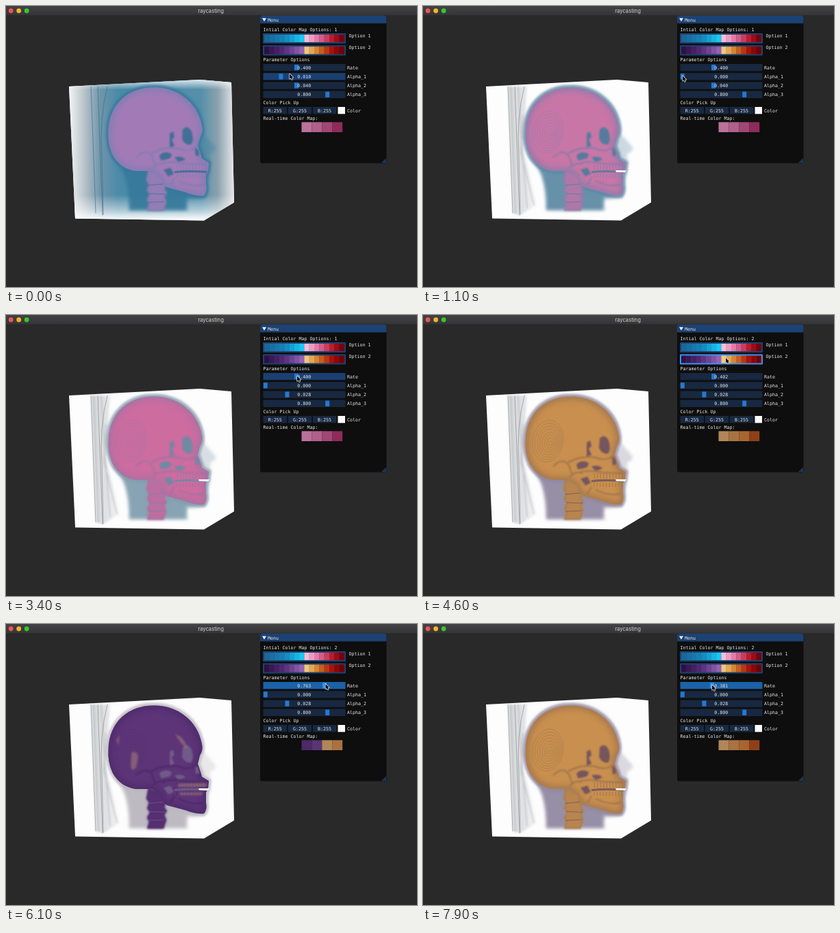
Recreate the animation shown at these times as an HTML page with a canvas. Size 600 px wide and 412 px high, loop 8000 ms.

```html
<!DOCTYPE html>
<html lang="en">
<head>
<meta charset="utf-8">
<title>raycasting</title>
<style>
html, body { margin: 0; width: 100%; height: 100%; overflow: hidden; background: #292929; }
canvas { display: block; }
</style>
</head>
<body>
<canvas width="600" height="412"></canvas>
<script>
const ctx = document.querySelector('canvas').getContext('2d');
const MONO = '6.65px "DejaVu Sans Mono", monospace';
const LOOP = 8000, STEP = 100;

// ---- helpers ----
const clamp = v => Math.max(0, Math.min(1, v));
const rgb = hex => [1, 3, 5].map(i => parseInt(hex.slice(i, i + 2), 16));
const mix = (a, b, k) => a.map((v, i) => v + (b[i] - v) * k);
const css = c => `rgb(${c.map(Math.round)})`;

// Piecewise eased motion through [time, ...values] keys.
function track(keys, t) {
  let i = keys.findIndex(key => key[0] > t);
  if (i < 0) return keys[keys.length - 1].slice(1);
  if (i === 0) return keys[0].slice(1);
  const [a, b] = [keys[i - 1], keys[i]];
  const k = (t - a[0]) / (b[0] - a[0]);
  return mix(a.slice(1), b.slice(1), k * k * (3 - 2 * k));
}

function ramp(stops, k) {
  const p = clamp(k) * (stops.length - 1), i = Math.min(stops.length - 2, Math.floor(p));
  return css(mix(rgb(stops[i]), rgb(stops[i + 1]), p - i));
}

function box(x, y, w, h, fill, r = 0) {
  ctx.fillStyle = fill;
  ctx.beginPath();
  ctx.roundRect(x, y, w, h, r);
  ctx.fill();
}

function text(s, x, y, align = 'left', font = MONO, fill = '#e8e8e8') {
  ctx.font = font;
  ctx.textAlign = align;
  ctx.fillStyle = fill;
  ctx.fillText(s, x, y);
}

function paint(path, fill, blur = 0, alpha = 1) {
  ctx.save();
  ctx.globalAlpha = alpha;
  if (blur) ctx.filter = `blur(${blur}px)`;
  ctx.fillStyle = fill;
  ctx.fill(path);
  ctx.restore();
}

function line(path, color, width, blur = 0, alpha = 1) {
  ctx.save();
  ctx.globalAlpha = alpha;
  if (blur) ctx.filter = `blur(${blur}px)`;
  ctx.strokeStyle = color;
  ctx.lineWidth = width;
  ctx.lineJoin = 'round';
  ctx.stroke(path);
  ctx.restore();
}

function gradient(x0, y0, x1, y1, ...stops) {
  const g = ctx.createLinearGradient(x0, y0, x1, y1);
  stops.forEach(([p, c]) => g.addColorStop(p, c));
  return g;
}

// ---- shapes of the scanned volume ----
const P = d => new Path2D(d);
const cube = P('M92 118L283 108L329 112L333 288L289 314.5L101 311.6Z');
const slab = P('M124 118L152 118L149 160L146 210L166 292L141 307L131 304Z');
const slits = P('M134 118L141 307M148 118Q136 165 140 220L142 306M124 118L131 304');
const streaks = P('M128 118L135 304M139 118L144 200L152 296M146 160L143 215L162 292');
const skin = P('M148 180C150 138 180 115 217 116C254 116 282 138 287 172C288 182 287 185 291 190L306 207Q308 212 299 216Q296 222 300 228L297 240L298 248L293 256Q296 268 292 280Q282 285 266 283Q262 290 267 300L180 300Q181 275 174 250Q170 236 158 222Q146 205 148 180Z');
const flesh = P('M156 220L215 225L285 215L290 276Q278 281 264 281L263 299L180 299Q181 272 174 250Q169 236 156 220Z');
const skull = P('M149.500 183C151 143 179 119.500 215 119.500C249 118.500 280 141 286 176C288 185 285 189 283 193L280 205Q284 216 286 224L296 230L295 241L292 247L292 262Q294 272 289 278Q276 279 262 273L236 266Q227 262 225 250L213 242L190 242Q167 239 155.500 218Q148 202 149.500 183Z');
const spine = P('M208 240L230 250L228 259L233 263L231 269L235 274L231 280L234 287L230 300L206 300L209 290L206 284L210 276L206 270L209 262L205 256Z');
const joints = P('M207 263L229 261M209 275L233 276M208 288L231 287');
const hollows = P('M258 181Q265 173 271 184Q275 198 270 203Q262 205 257 195ZM276 208Q282 209 282 219L277 220ZM224 219Q232 211 242 217L240 223Q232 226 226 226ZM246 222Q257 219 262 225L252 229ZM230 240L240 237L245 246L237 250ZM239 187L244 184L246 192L242 196L246 205L239 208Z');
const cheek = P('M212 216Q232 205 252 209Q264 215 278 207M190 222Q203 208 213 220L218 235M230 230Q246 227 262 231L292 232M214 238Q222 228 232 232M246 252L240 262M252 256Q270 266 288 262');
const bite = P('M246 242Q268 239.500 294 242L292 245Q268 243 246 245Z');
const gleam = P('M281 241L297 241L295 244L282 243.500Z');
const patches = P('M183 189Q192 184 193 196L190 211Q182 218 182 207ZM247 161Q262 167 265 184Q253 174 247 161ZM251 234L293 233L293 239L251 239ZM252 247L288 247L286 251L254 251ZM161 170L166 163L164 178Z');
let teeth = '';
for (let x = 250; x < 295; x += 4.5) teeth += `M${x} 232L${x + 0.5} 240M${x} 246L${x - 0.5} 252`;
teeth = P(teeth);

// Colours: bone, bone edge, hollow, flesh.
const look = (...colors) => colors.map(rgb);
const HAZY = look('#a27bb6', '#757fb4', '#386d95', '#37799c');
const DENSE = look('#c876a6', '#767fae', '#4b7d9c', '#5b89a4');
const CLEAR = look('#ce669b', '#aa709f', '#7896aa', '#96a9b3');
const AMBER = look('#c88f4e', '#946f50', '#6d5060', '#8f87a0');
const VIOLET = look('#5c3477', '#482767', '#73608a', '#b9b6bd');
const mixLook = (a, b, k) => a.map((c, i) => mix(c, b[i], clamp(k)));

function volume(s) {
  const haze = clamp(s.alpha1 / 0.01);
  const toViolet = clamp((s.rate - 0.42) / 0.3);
  const colors = s.option === 1
    ? mixLook(mixLook(CLEAR, DENSE, (s.alpha2 - 0.021) / 0.019), HAZY, haze)
    : mixLook(AMBER, VIOLET, toViolet);
  const [bone, edge, hollow, soft] = colors.map(css);

  paint(cube, '#fdfdfd');
  ctx.save();
  ctx.clip(cube);
  paint(slab, gradient(124, 0, 168, 0, [0, '#cccfd1'], [0.55, '#e0e1e3'], [1, '#f8f8f8']), 1.5, 0.9);
  line(streaks, '#a9acb0', 1.6, 0.8, 0.5);

  if (haze) {
    ctx.globalAlpha = haze;
    box(90, 105, 245, 212, gradient(92, 0, 333, 0, [0, '#f4f4f4'], [0.1, '#b3bec5'],
      [0.19, '#6e95aa'], [0.3, '#4b8aa8'], [0.8, '#5590ab'], [0.9, '#8aa1ad'], [1, '#e6e8e9']));
    box(90, 105, 245, 212, gradient(0, 108, 0, 314, [0, '#ffffffcc'], [0.07, '#ffffff00'],
      [0.82, '#ffffff00'], [0.93, '#ffffff88'], [1, '#ffffff']));
    ctx.globalAlpha = 1;
  }
  line(slits, haze > 0.5 ? '#3d6d88' : '#85898d', 1, 0.4, 0.65);

  paint(skin, soft, 2, 0.3);
  paint(flesh, soft, 2.5, 0.9);
  line(skull, soft, 7, 1.6, 0.75);
  paint(spine, edge, 0.8);
  paint(spine, bone, 2, 0.7);
  line(joints, hollow, 1.2, 0.5, 0.7);

  paint(skull, bone, 0.6);
  ctx.save();
  ctx.clip(skull);
  line(skull, edge, 8, 4, 0.8);
  for (let r = 3; r < 34; r += 4) {
    const ring = new Path2D();
    ring.ellipse(187 - r * 0.15, 188 - r * 0.1, r * 0.72, r, 0.15, 0, 7);
    line(ring, edge, 0.8, 0, 0.5 * (1 - haze) * (1 - toViolet * 0.7));
  }
  paint(hollows, hollow, 1, 0.9);
  line(cheek, edge, 2, 0.9, 0.85);
  line(teeth, edge, 0.9, 0.3, 0.8);
  if (s.option === 2) paint(patches, '#b08a78', 1.5, 0.5 * toViolet);
  ctx.restore();
  paint(bite, hollow, 0.6, 0.8);
  paint(gleam, '#fdfdfd', 0.4, 1 - haze);
  ctx.restore();
}

// ---- interface ----
const BLUES = ['#1b6798', '#1583bb', '#18c9f3'];
const REDS = ['#f8bdd7', '#e783ad', '#cf4d79', '#b9141f', '#78000c'];
const PURPLES = ['#2e1044', '#562b78', '#9362b4'];
const EARTHS = ['#f0c67f', '#d99036', '#c14a14', '#a20a08', '#720003'];
const LIVE_1 = ['#bb719b', '#b0608a', '#a04776', '#8f2b5b'];
const LIVE_2 = ['#4b2a67', '#5a3475', '#b1865a', '#a87340', '#a86530', '#8f4018'];
const ROW_FILL = ['#182840', '#1b3f70', '#1b62a7'];

function colorBar(y, cold, warm, hover) {
  box(375, y, 121, 15, hover ? '#3d91ee' : '#1d4270', 1);
  for (let i = 0; i < 16; i++) {
    const fill = i < 8 ? ramp(cold, i / 7) : ramp(warm, (i - 8) / 7);
    box(377 + i * 7.3, y + 2, 7.4, 11, fill);
  }
}

function slider(row, name, value, max, heat) {
  const y = 85 + row * 13.2, x = 378.8 + 113 * value / max;
  box(375.5, y, 120, 10.3, ROW_FILL[heat]);
  box(x - 3, y + 1, 6, 8.3, heat === 2 ? '#3790ee' : '#2578d4');
  text(value.toFixed(3), 435.2, y + 7.6, 'center');
  text(name, 498, y + 7.6);
}

function menu(s) {
  box(371, 14, 184.5, 216.5, '#0e0e0e', 3);
  box(371, 14, 184.5, 11.5, '#1c4173', [3, 3, 0, 0]);
  paint(P('M374 17.8L380 17.8L377 22.8Z'), '#f4f4f4');
  paint(P('M555 223L555 230L548 230Z'), '#18365f');
  text('Menu', 382, 22.6);
  text('Intial Color Map Options: ' + s.option, 375.6, 36.6);
  colorBar(40, BLUES, REDS, false);
  colorBar(57.5, PURPLES, EARTHS, s.hoverBar);
  text('Option 1', 500.5, 46);
  text('Option 2', 500.5, 63);
  text('Parameter Options', 375.6, 81);
  slider(0, 'Rate', s.rate, 1, s.heat[0]);
  slider(1, 'Alpha_1', s.alpha1, 0.05, s.heat[1]);
  slider(2, 'Alpha_2', s.alpha2, 0.1, s.heat[2]);
  slider(3, 'Alpha_3', 0.8, 1, 0);
  text('Color Pick Up', 375.6, 144.3);
  ['R', 'G', 'B'].forEach((c, i) => {
    box(375.5 + i * 36.2, 148, 34.5, 10.3, ROW_FILL[0]);
    text(c + ':255', 392.7 + i * 36.2, 155.6, 'center');
  });
  box(484.5, 148, 10.5, 10.3, '#fafafa');
  text('Color', 498, 155.6);
  text('Real-time Color Map:', 375.6, 167.2);
  const first = Math.round(2 - 2 * clamp((s.rate - 0.4) / 0.36));
  const live = s.option === 1 ? LIVE_1 : LIVE_2.slice(first, first + 4);
  live.forEach((c, i) => box(431.5 + i * 14.9, 170.3, 15, 14.7, c));
}

function titleBar() {
  box(0, 0, 600, 13.5, gradient(0, 0, 0, 13, [0, '#434244'], [1, '#363537']));
  ['#f0544f', '#f2b52d', '#35c92f'].forEach((c, i) => box(3.8 + i * 11.5, 3.6, 6.8, 6.8, c, 4));
  text('raycasting', 299, 9.9, 'center', '7.7px Inter, sans-serif', '#d2d2d2');
}

function cursor(x, y) {
  ctx.save();
  ctx.translate(x, y);
  ctx.scale(0.86, 0.86);
  const arrow = P('M0 0L0 8.6L2 6.9L3.4 10L5 9.3L3.6 6.3L6.2 6.1Z');
  line(arrow, '#f4f4f4', 1.5);
  paint(arrow, '#080808');
  ctx.restore();
}

// ---- timeline ----
const POINTER = [[0, 414, 99.5], [300, 402, 102.5], [900, 379, 102.5], [1200, 379, 102.5],
  [1600, 424, 116], [2200, 404.5, 115.5], [2600, 410, 116], [2800, 410, 116],
  [3300, 425, 89.5], [3700, 425, 89.5], [4300, 442, 63], [4800, 442, 63],
  [5200, 424, 89], [6100, 466.5, 88], [6400, 466.5, 88], [7700, 422, 89.5]];
const ALPHA_1 = [[300, 0.01], [900, 0]];
const ALPHA_2 = [[1600, 0.04], [2200, 0.023], [2600, 0.028]];
const RATE = [[3500, 0.4], [3600, 0.402], [5200, 0.402], [6100, 0.763], [6400, 0.763], [7700, 0.381]];

function state(t) {
  const within = (a, b) => t >= a && t < b;
  return {
    alpha1: track(ALPHA_1, t)[0],
    alpha2: track(ALPHA_2, t)[0],
    rate: track(RATE, t)[0],
    option: t < 4400 ? 1 : 2,
    hoverBar: within(4100, 5000),
    heat: [
      within(3500, 3700) || t >= 5200 ? 2 : within(3200, 3900) || within(5100, 5200) ? 1 : 0,
      within(300, 1000) ? 2 : t < 300 ? 1 : 0,
      within(1600, 2700) ? 2 : within(1500, 2900) ? 1 : 0
    ]
  };
}

function draw(now) {
  const t = Math.floor(now % LOOP / STEP) * STEP;
  const s = state(t);
  box(0, 0, 600, 412, '#292929');
  titleBar();
  volume(s);
  menu(s);
  cursor(...track(POINTER, t));
}

const start = performance.now();
(function tick() {
  draw(performance.now() - start);
  requestAnimationFrame(tick);
})();
</script>
</body>
</html>
```
